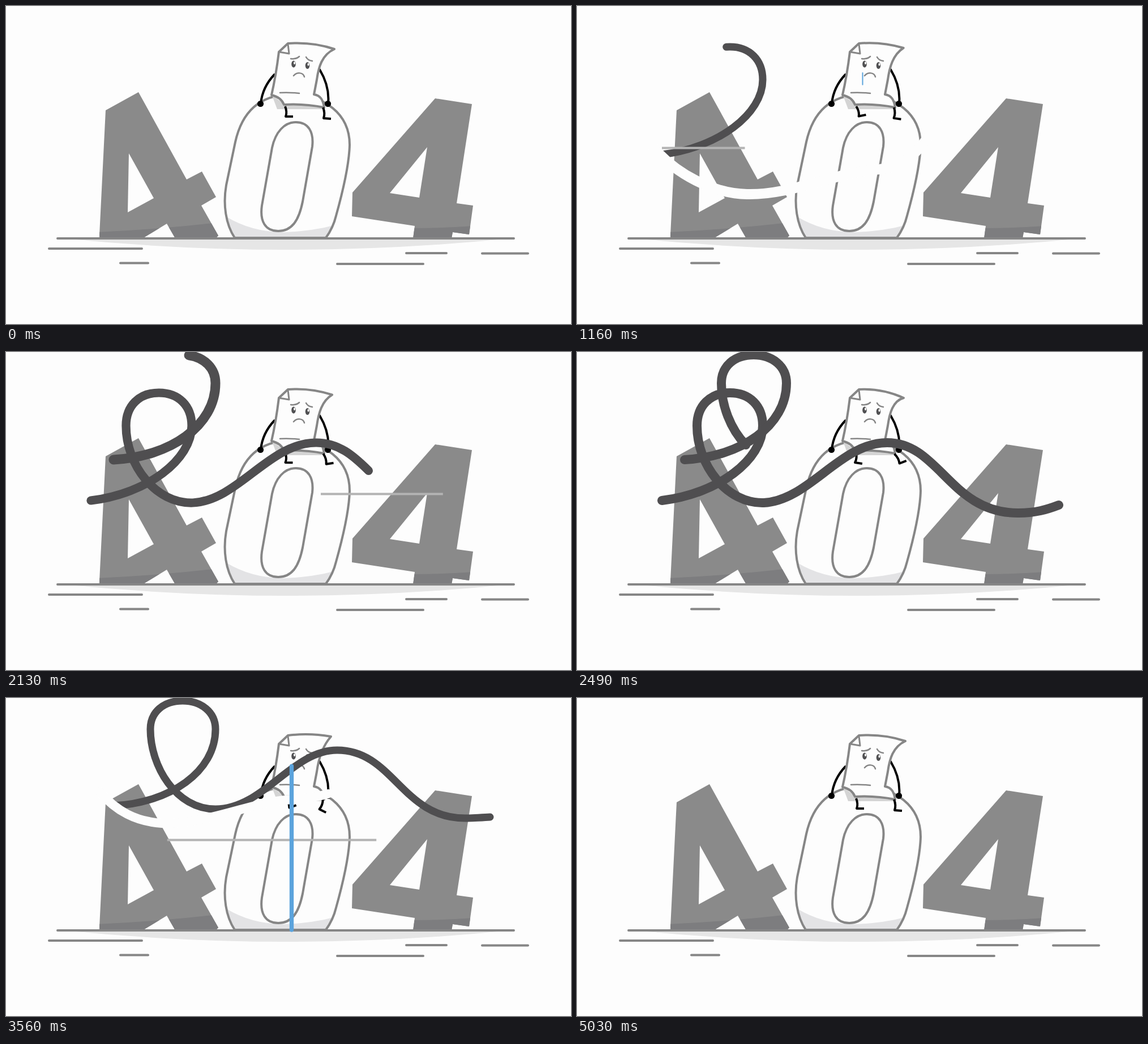
An HTML page that plays this animation: 998x561 px, repeating every 5050 ms.

```html
<!DOCTYPE html>
<html lang="en">
<head>
<meta charset="utf-8">
<title>404</title>
<style>
html, body { margin: 0; width: 100%; height: 100%; overflow: hidden; background: #fdfdfd; }
svg { display: block; width: 100vw; height: 100vh; }
.line { fill: none; stroke: #868686; stroke-width: 4; stroke-linecap: round; stroke-linejoin: round; }
.paper { fill: #fdfdfd; }
.limb { fill: none; stroke: #000; stroke-width: 4; stroke-linecap: round; stroke-linejoin: round; }
.digit { fill: #8a8a8a; fill-rule: evenodd; }
.shade { fill: #7d7d7f; }
.rope { stroke: #4f4e50; }
.gust { stroke: #fdfdfd; }
.rope, .gust { fill: none; stroke-linecap: round; stroke-linejoin: round; }
</style>
</head>
<body>
<svg viewBox="0 0 998 561" preserveAspectRatio="none">
  <clipPath id="leftClip"><path id="leftFour" clip-rule="evenodd" d="M176 184L234 152L319 306L346 292L371 337L345 352L375 405L370 410H299L284 384L241 410H165V404Z M217 260L261 339L215 364Z"/></clipPath>
  <clipPath id="rightClip"><path id="rightFour" clip-rule="evenodd" d="M758 163L823 173L796 348L825 352L818 403L789 399L787 410H719L722 388L611 371L612 329Z M744 249L730 338L678 330Z"/></clipPath>
  <clipPath id="zeroClip"><path id="zero" d="M404 409C388 385 383 350 389 316L405 240C415 195 440 158 500 156C562 156 607 190 607 245C606 285 590 345 583 370Q578 391 565 409Z"/></clipPath>

  <path fill="#e6e6e6" d="M112 411Q500 449 880 411Z"/>
  <use href="#leftFour" class="digit"/>
  <path class="shade" clip-path="url(#leftClip)" d="M160 399Q270 394 375 382V411H160Z"/>
  <use href="#rightFour" class="digit"/>
  <path class="shade" clip-path="url(#rightClip)" d="M715 392Q770 392 825 388V411H715Z"/>

  <use href="#zero" class="paper"/>
  <path fill="#e3e3e5" clip-path="url(#zeroClip)" d="M388 371Q435 400 495 399Q550 396 585 385V410H388Z"/>
  <use href="#zero" class="line"/>
  <path class="line paper" style="fill:#fdfdfd" d="M470 250C476 222 492 205 512 205C534 205 544 222 541 248L524 345C517 380 504 397 481 397C458 397 448 380 452 352Z"/>
  <path class="line" d="M91 410H897M76 428H240M202 453.5H251M707 436H778M585 455H737M841 436.5H922"/>

  <path class="limb" d="M474 121Q453 143 450 172M554 112Q572 142 569 172"/>
  <circle cx="449.500" cy="172.500" r="5.600"/><circle cx="568.500" cy="172.500" r="5.600"/>
  <path fill="#d4d4d4" d="M470 158L479 182L558 182L561 178L491 172Z"/>
  <path id="page" class="line" style="fill:#fdfdfd"/>
  <path class="line" style="stroke-width:3" d="M482 81L500 84L498 67"/>
  <path class="line" style="stroke-width:2.500" d="M484 153Q500 152 518 154"/>
  <path class="line" style="stroke-width:2.500" d="M503 93Q513 94 518 89M530 90Q533 96 541 97M508 123C514 116 525 117 527 125"/>
  <g fill="#505052">
    <ellipse cx="508" cy="102.500" rx="3.800" ry="6"/><ellipse cx="532.500" cy="105" rx="3.800" ry="6"/>
  </g>
  <g fill="#fdfdfd">
    <ellipse cx="509.500" cy="100.500" rx="1.500" ry="2.500"/><ellipse cx="534" cy="103" rx="1.500" ry="2.500"/>
  </g>
  <path id="legL" class="limb" style="stroke-linecap:butt" d="M493 177Q497 187 494 195H507"/>
  <path id="legR" class="limb" style="stroke-linecap:butt" d="M560 179Q564 189 561 198L574 199"/>

  <path id="ropeA" class="rope" d="M150 262C250 250 328 190 328 130C328 95 305 72 270 72C235 72 212 95 212 130C212 200 265 268 330 266C410 262 465 160 548 160C640 160 660 285 780 284C810 284 830 278 851 270"/>
  <path id="ropeB" class="rope" d="M190 190C290 185 370 130 370 55C370 25 345 5 312 5C278 5 255 25 255 55C255 120 300 196 370 196C455 196 505 92 585 92C685 92 700 215 815 212C835 211 845 211 855 210"/>
  <path id="breeze" fill="none" stroke="#b3b3b3" stroke-width="4"/>
  <path id="wisp" fill="none" stroke="#555" d="M106 265L134 263M148 261.500L152 261"/>
  <path id="gustA" class="gust" d="M135 250C175 296 240 331 300 332C380 334 460 292 535 288C585 284 645 230 645 140C645 105 625 85 602 85C570 85 549 95 549 130C549 185 575 205 605 209Q625 214 640 220"/>
  <path id="gustB" class="gust" d="M165 165C195 200 230 218 275 221C340 224 420 192 470 183C510 177 545 178 575 167C640 145 650 60 600 25C570 15 545 30 548 55C552 75 575 90 610 100"/>
  <path id="tear" fill="none" stroke="#5ba3dc" stroke-linecap="round"/>
</svg>
<script>
const LOOP = 5050;
const el = id => document.getElementById(id);
const clamp = (v, lo = 0, hi = 1) => Math.min(hi, Math.max(lo, v));
const mix = (a, b, k) => a + (b - a) * k;
const span = (t, a, b) => clamp((t - a) / (b - a));

// Eased interpolation through [time, value] pairs
function track(keys, t) {
  let i = 1;
  while (i < keys.length - 1 && keys[i][0] < t) i++;
  const [t0, v0] = keys[i - 1], [t1, v1] = keys[i];
  return mix(v0, v1, (1 - Math.cos(Math.PI * span(t, t0, t1))) / 2);
}

const swingL = [[0, 0], [450, -17], [1740, -7], [2490, 9], [3560, -20], [4330, -17], [LOOP, 0]];
const swingR = [[0, 0], [450, 10], [1740, 0], [2490, -25], [3560, 22], [4330, 10], [LOOP, 0]];
const tipX = [[0, 580], [450, 579], [1740, 575], [2490, 577], [3560, 574], [4330, 577], [LOOP, 580]];
const tipY = [[0, 76], [450, 81], [1740, 69], [2490, 81], [3560, 68], [4330, 72], [LOOP, 76]];

// from/to: drawing time; end: moment the stroke has thinned away
const strokes = [
  { id: 'ropeA', from: 650, to: 2490, end: 2950, w0: 12, w1: 16, thin: 230 },
  { id: 'ropeB', from: 1595, to: 3545, end: 3790, w0: 18.500, w1: 13, thin: 220 },
  { id: 'gustA', from: 90, speed: .6, end: 2120, w0: 7, w1: 23, thin: 250 },
  { id: 'gustB', from: 2850, speed: .6, end: 4850, w0: 7, w1: 23, thin: 250 }
];
for (const s of strokes) {
  s.node = el(s.id);
  s.length = s.node.getTotalLength();
  if (s.speed) s.to = s.from + s.length / s.speed;
}

function drawStroke(s, t) {
  const on = t > s.from && t < s.end;
  s.node.style.display = on ? '' : 'none';
  if (!on) return;
  const width = mix(s.w0, s.w1, span(t, s.from, s.to)) * span(t, s.end, s.end - s.thin);
  s.node.setAttribute('stroke-width', width);
  s.node.setAttribute('stroke-dasharray', `${s.length * span(t, s.from, s.to)} 5000`);
}

function drawBreeze(t) {
  const start = t < 2600 ? 862 : 2532;
  const age = t - start, tau = Math.max(0, age - 878);
  const head = clamp(150 + .49 * age, 150, 850);
  const tail = 150 + .8 * tau + .00061 * tau * tau;
  el('breeze').setAttribute('d', head > tail ? `M${tail} 250.500H${head}` : '');
}

function drawTear(t) {
  const drop = t < 2500 ? 1500 : 3540;
  const tau = t - drop;
  const on = tau > -450 && tau < 285;
  const head = mix(115, 409, span(tau, -450, -60) ** 2);
  const tail = mix(118, 409, span(tau, 0, 270) ** 1.900);
  el('tear').setAttribute('d', on && head > tail ? `M504.500 ${tail}V${head}` : '');
  el('tear').setAttribute('stroke-width', clamp(7 + tau / 60, 2, 11));
}

function render(t) {
  const x = track(tipX, t), y = track(tipY, t);
  el('page').setAttribute('d',
    `M498 66Q${x - 38} ${63 + (y - 76) * .2} ${x} ${y}C558 86 552 108 549 130L544 156` +
    'C556 158 560 166 562 179Q526 172 491 174Q486 161 469 157Q477 122 482 81Z');
  el('legL').setAttribute('transform', `rotate(${track(swingL, t)} 493 176)`);
  el('legR').setAttribute('transform', `rotate(${track(swingR, t)} 562 178)`);
  for (const s of strokes) drawStroke(s, t);
  drawBreeze(t);
  drawTear(t);
  el('wisp').style.display = t > 410 && t < 520 ? '' : 'none';
}

const begin = performance.now();
function tick() {
  render((performance.now() - begin) % LOOP);
  requestAnimationFrame(tick);
}
tick();
</script>
</body>
</html>
```
